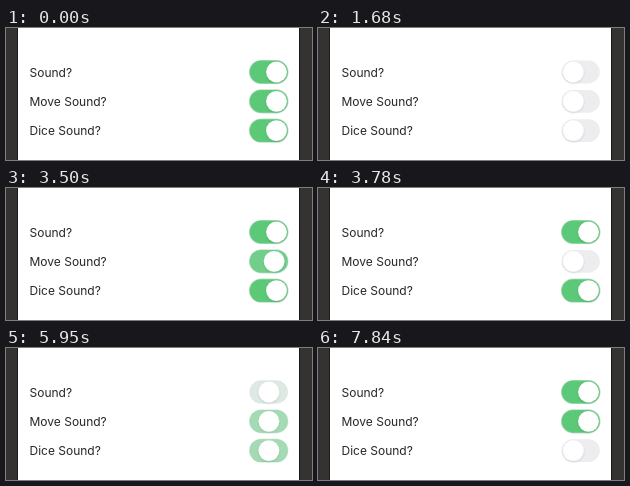
Write an HTML page that moves like this. It is 306x132 px and loops after 8000 ms.

```html
<!DOCTYPE html>
<html lang="en">
<head>
<meta charset="utf-8">
<title>Sound switches</title>
<style>
  html, body { margin: 0; width: 100%; height: 100%; overflow: hidden; background: #fff; }
  svg { display: block; width: 306px; height: 132px; }
  text { font: 12px Inter, "Liberation Sans", sans-serif; fill: #262626; }
</style>
</head>
<body>
<svg id="stage" viewBox="0 0 306 132">
  <defs>
    <filter id="shadow" x="-30%" y="-30%" width="160%" height="170%">
      <feDropShadow dx="0" dy="1" stdDeviation="0.9" flood-opacity="0.14"/>
    </filter>
  </defs>
  <rect width="306" height="132" fill="#353331"/>
  <rect x="11" width="283" height="132" fill="#1d1b1a"/>
  <rect x="12" width="281" height="132" fill="#fff"/>
</svg>
<script>
const LOOP = 8000, STEP = 70, SLIDE = 280;
const OFF = [237, 237, 239], ON = [91, 201, 120];
const MASTER = 0;

// Each tap flips one row; the master row sets every row.
const taps = [
  { at: 1330, row: MASTER, on: 0 },
  { at: 2450, row: MASTER, on: 1 },
  { at: 3430, row: 1, on: 0 },
  { at: 4830, row: MASTER, on: 0 },
  { at: 5810, row: MASTER, on: 1 },
  { at: 7560, row: 2, on: 0 }
];

const stage = document.getElementById('stage');

function add(tag, attrs) {
  const el = document.createElementNS('http://www.w3.org/2000/svg', tag);
  for (const key in attrs) el.setAttribute(key, attrs[key]);
  return stage.appendChild(el);
}

const rows = ['Sound?', 'Move Sound?', 'Dice Sound?'].map((label, i) => {
  const y = 44 + 29.3 * i;
  add('text', { x: 23.5, y: Math.round(y + 4.6) }).textContent = label;
  return {
    track: add('rect', { x: 243.6, y: y - 11.4, width: 38.2, height: 22.8, rx: 11.4,
      stroke: '#7cc592', 'stroke-width': 1.4 }),
    thumb: add('circle', { cy: y, r: 10.4, fill: '#fff', filter: 'url(#shadow)' })
  };
});

const ease = p => {
  p = Math.max(0, Math.min(1, p));
  return p * p * (3 - 2 * p);
};

function draw(now) {
  const t = Math.floor(now % LOOP / STEP) * STEP;
  rows.forEach(({ track, thumb }, i) => {
    let slide = 1, tint = 1;
    for (const { at, row, on } of taps) {
      if (row !== MASTER && row !== i) continue;
      // The tapped master turns green a little later than the rows that follow it.
      const lag = on && i === MASTER ? STEP : 0;
      slide += (on - slide) * ease((t - at) / SLIDE);
      tint += (on - tint) * ease((t - at - lag) / (SLIDE + lag));
    }
    thumb.setAttribute('cx', 255.3 + 15.2 * slide);
    track.setAttribute('fill', `rgb(${OFF.map((c, k) => c + (ON[k] - c) * tint)})`);
    track.setAttribute('stroke-opacity', 0.5 * tint);
  });
  requestAnimationFrame(draw);
}
requestAnimationFrame(draw);
</script>
</body>
</html>
```
